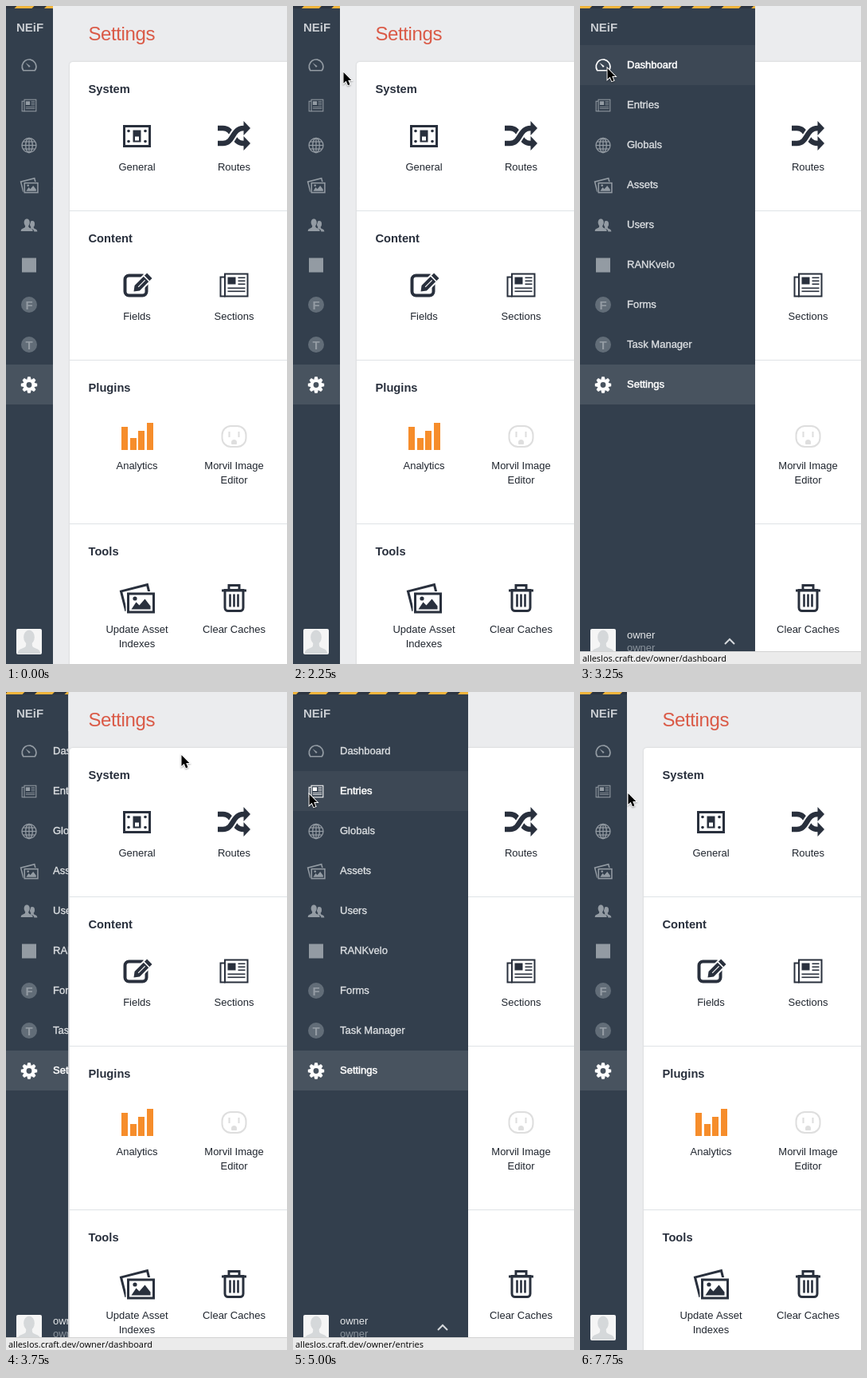
These frames come from a looping animation (353 by 824 pixels, 8 s). An HTML page with a canvas:

```html
<!DOCTYPE html>
<html lang="en">
<head>
<meta charset="utf-8">
<title>Settings sidebar</title>
<style>
html, body { margin: 0; width: 100%; height: 100%; overflow: hidden; background: #ebecee; }
canvas { display: block; width: 353px; height: 824px; }
</style>
</head>
<body>
<canvas id="stage"></canvas>
<script>
const W = 353, H = 824, LOOP = 8000, STEP = 250;
const canvas = document.getElementById('stage');
const ctx = canvas.getContext('2d');
const ratio = window.devicePixelRatio || 1;
canvas.width = W * ratio;
canvas.height = H * ratio;

const SANS = '"Liberation Sans", Arial, sans-serif';
const INK = '#29303d', NAV = '#333f4d', MUTED = '#939ba3', PAPER = '#fff';
const CLOSED = 59, OPEN = 220, SLIDE = 250, LINGER = 700;
const ROW = 50, ROWS_TOP = 49;

const VISITS = [
  { page: 'dashboard', enter: 2275, leave: 3530 },
  { page: 'entries', enter: 4750, leave: 5764 }
];
const STOPS = [
  { t: 250, x: 173, y: 171 },
  { t: 2250, x: 63, y: 83 },
  { t: 2500, x: 30, y: 78 },
  { t: 3250, x: 34, y: 78 },
  { t: 3750, x: 220, y: 79 },
  { t: 5000, x: 20, y: 128 },
  { t: 5500, x: 24, y: 129 },
  { t: 6000, x: 248, y: 130 },
  { t: 7750, x: 60, y: 127 }
];

const ramp = (t, from, length) => Math.min(1, Math.max(0, (t - from) / length));

function pointerAt(t) {
  let { x, y } = STOPS[0];
  STOPS.slice(1).forEach((stop, i) => {
    const p = ramp(t, STOPS[i].t, stop.t - STOPS[i].t);
    x += (stop.x - STOPS[i].x) * p;
    y += (stop.y - STOPS[i].y) * p;
  });
  return { x, y };
}

function sidebarWidth(t) {
  const open = VISITS.reduce((sum, v) => sum + ramp(t, v.enter, SLIDE) - ramp(t, v.leave, SLIDE), 0);
  return CLOSED + (OPEN - CLOSED) * open;
}

function rect(x, y, w, h, color) {
  if (color) ctx.fillStyle = color;
  ctx.fillRect(x, y, w, h);
}

function text(str, x, y, color, font = `13px ${SANS}`, align = 'left') {
  ctx.font = font;
  ctx.textAlign = align;
  ctx.fillStyle = color;
  ctx.fillText(str, x, y);
}

function line(...p) {
  ctx.beginPath();
  for (let i = 0; i < p.length; i += 2) ctx.lineTo(p[i], p[i + 1]);
}

function disc(x, y, rx, ry = rx) {
  ctx.beginPath();
  ctx.ellipse(x, y, rx, ry, 0, 0, Math.PI * 2);
}

function rounded(x, y, w, h, r) {
  ctx.beginPath();
  ctx.roundRect(x, y, w, h, r);
}

// Icons are drawn around their centre
function icon(draw, x, y, color, bg, scale = 1) {
  ctx.save();
  ctx.translate(x, y);
  ctx.scale(scale, scale);
  ctx.fillStyle = ctx.strokeStyle = color;
  ctx.lineWidth = 2;
  draw(color, bg);
  ctx.restore();
}

function news() {
  ctx.strokeRect(-11.5, -14, 28.5, 28);
  line(-11.5, -10, -17, -10, -17, 14, -11, 14);
  ctx.stroke();
  rect(-8, -10, 10, 9);
  for (let i = 0; i < 3; i++) rect(5, -10 + i * 4, 9, 1.6);
  for (let i = 0; i < 2; i++) rect(-8, 3 + i * 4, 22, 1.6);
}

function photos(color, bg) {
  ctx.lineWidth = 3;
  ctx.save();
  ctx.translate(-20, -8.5);
  ctx.rotate(-0.25);
  ctx.strokeRect(0, 0, 34, 24);
  ctx.restore();
  rect(-14, -8.5, 38, 29, bg);
  ctx.strokeRect(-11, -5.5, 32, 23);
  ctx.fillStyle = color;
  line(-7, 14, -1, 5, 3, 9, 10, 1, 17, 10, 17, 14);
  ctx.fill();
  disc(-2.5, 0.5, 2.6);
  ctx.fill();
}

function gauge() {
  ctx.lineWidth = 1.7;
  ctx.beginPath();
  ctx.arc(0, 1.3, 8.8, Math.PI * 0.81, Math.PI * 2.19);
  ctx.closePath();
  ctx.stroke();
  line(-4.5, -3.5, 1.6, 0.7, 0, 2.4);
  ctx.fill();
}

function globe() {
  ctx.lineWidth = 1.3;
  for (const rx of [9, 4.3]) {
    disc(0, 0, rx, 9);
    ctx.stroke();
  }
  rect(-0.6, -9, 1.2, 18);
  for (const y of [-4.5, 0, 4.5]) {
    const r = Math.sqrt(81 - y * y);
    rect(-r, y - 0.6, 2 * r, 1.2);
  }
}

function person(x, y, s) {
  ctx.save();
  ctx.translate(x, y);
  ctx.scale(s, s);
  disc(0, -4, 3.6, 4.7);
  ctx.fill();
  rect(-2, -2, 4, 6);
  ctx.beginPath();
  ctx.moveTo(-7.5, 7);
  ctx.bezierCurveTo(-7.5, 2.5, -2, 4, -2, 1);
  ctx.lineTo(2, 1);
  ctx.bezierCurveTo(2, 4, 7.5, 2.5, 7.5, 7);
  ctx.fill();
  ctx.restore();
}

function users(color, bg) {
  person(4, 2, 0.85);
  ctx.fillStyle = bg;
  person(-2.4, 0.2, 1.18);
  ctx.fillStyle = color;
  person(-2.8, 0.6, 1);
}

const square = () => rect(-9, -9, 18, 18);

const badge = letter => color => {
  disc(0, -0.5, 10);
  ctx.fillStyle = '#626d78';
  ctx.fill();
  text(letter, 0, 5, color, `bold 15px ${SANS}`, 'center');
};

function gear(color, bg) {
  disc(0, 0, 7.5);
  ctx.fill();
  for (let i = 0; i < 8; i++) {
    line(-2.6, -7, -1.7, -10.2, 1.7, -10.2, 2.6, -7);
    ctx.fill();
    ctx.rotate(Math.PI / 4);
  }
  disc(0, 0, 3.4);
  ctx.fillStyle = bg;
  ctx.fill();
}

function lightSwitch(color, bg) {
  ctx.lineWidth = 3;
  ctx.strokeRect(-16, -12, 32, 25);
  rect(-5, -7, 10, 15);
  rect(-2.5, 1, 5, 5, bg);
  ctx.fillStyle = color;
  for (const x of [-10.5, 10.5]) for (const y of [-6, 7]) {
    disc(x, y, 1.8);
    ctx.fill();
  }
}

function shuffle(color, bg) {
  const strand = (dir, width, paint) => {
    ctx.beginPath();
    ctx.moveTo(-20.5, -9.5 * dir);
    ctx.lineTo(-14, -9.5 * dir);
    ctx.bezierCurveTo(0, -9.5 * dir, -3, 9.5 * dir, 12, 9.5 * dir);
    ctx.lineTo(14, 9.5 * dir);
    ctx.lineWidth = width;
    ctx.strokeStyle = paint;
    ctx.stroke();
  };
  strand(1, 6.5, color);
  ctx.save();
  ctx.beginPath();
  ctx.rect(-9, -8, 16, 16);
  ctx.clip();
  strand(-1, 10.5, bg);
  ctx.restore();
  strand(-1, 6.5, color);
  for (const y of [-9.5, 9.5]) {
    line(12, y - 9, 20.5, y, 12, y + 9);
    ctx.fill();
  }
}

function edit(color, bg) {
  ctx.lineWidth = 4;
  rounded(-15, -12, 27, 25, 5);
  ctx.stroke();
  ctx.translate(-4, 8);
  ctx.rotate(-Math.PI / 4);
  line(0, 0, 6, -4.5, 28, -4.5, 28, 4.5, 6, 4.5);
  ctx.closePath();
  ctx.strokeStyle = bg;
  ctx.stroke();
  ctx.fill();
  rect(22, -5, 1.5, 10, bg);
  rect(8, -0.6, 12, 1.2, bg);
}

function bars() {
  [29, 15, 24, 34].forEach((h, i) => rect(Math.round(i * 10.67) - 19.5, 19.5 - h, 8, h));
}

function outlet() {
  rounded(-15, -10.5, 30, 26, 11);
  ctx.stroke();
  for (const x of [-7, 5]) rect(x, -3.5, 2, 7);
  rounded(-3.5, 6.5, 7, 6, [3.5, 3.5, 1, 1]);
  ctx.fill();
}

function trash() {
  ctx.lineWidth = 3;
  rect(-15.5, -11, 31, 3);
  ctx.strokeRect(-6.5, -16, 13, 6);
  rounded(-11.5, -10, 23, 26, [0, 0, 4, 4]);
  ctx.stroke();
  for (let x = -6.3; x < 6; x += 5) rect(x, -5, 2.6, 16);
}

const SECTIONS = [
  { name: 'System', top: 69, tiles: [[lightSwitch, 'General'], [shuffle, 'Routes']] },
  { name: 'Content', top: 256, tiles: [[edit, 'Fields'], [news, 'Sections']] },
  { name: 'Plugins', top: 443, tiles: [[bars, 'Analytics'], [outlet, 'Morvil Image', 'Editor']] },
  { name: 'Tools', top: 648, tiles: [[photos, 'Update Asset', 'Indexes'], [trash, 'Clear Caches']] }
];
const TINTS = new Map([[bars, '#f68d2b'], [outlet, '#dedede']]);

const MENU = [
  ['Dashboard', gauge], ['Entries', news, 0.52], ['Globals', globe], ['Assets', photos, 0.52],
  ['Users', users], ['RANKvelo', square], ['Forms', badge('F')],
  ['Task Manager', badge('T')], ['Settings', gear]
];

function drawPage() {
  rect(0, 0, W, H, '#ebecee');
  ctx.letterSpacing = '-0.4px';
  text('Settings', 103.5, 43, '#da5a47', `24px ${SANS}`);
  ctx.letterSpacing = '0px';

  ctx.save();
  ctx.shadowColor = 'rgba(40,50,60,.22)';
  ctx.shadowBlur = 2 * ratio;
  ctx.fillStyle = PAPER;
  rounded(80, 70, 300, 800, 4);
  ctx.fill();
  ctx.restore();

  SECTIONS.forEach(({ name, top, tiles }, i) => {
    if (i) rect(80, top, W, 1, '#dfe3e6');
    text(name, 103.5, top + 40, INK, `bold 14.7px ${SANS}`);
    tiles.forEach(([draw, ...words], col) => {
      const x = 164.5 + col * 122;
      icon(draw, x, top + 93.5, TINTS.get(draw) || INK, PAPER);
      words.forEach((word, n) => text(word, x, top + 137 + n * 18, '#20262f', undefined, 'center'));
    });
  });
}

function drawStripe(width, t) {
  const gap = 37.5, start = 15 + (t - 2500) * 0.0168;
  rect(0, 0, width, 3, '#2d3541');
  ctx.fillStyle = '#f1b43c';
  for (let x = start % gap - 2 * gap; x < width; x += gap) {
    line(x, 3, x + 3, 0, x + 25, 0, x + 22, 3);
    ctx.fill();
  }
}

function drawMenu(width, hover) {
  MENU.forEach(([label, draw, scale], i) => {
    const selected = label === 'Settings', lit = selected || i === hover;
    const top = ROWS_TOP + i * ROW;
    const bg = selected ? '#48535f' : lit ? '#3d4855' : NAV;
    const color = lit ? '#fff' : '#dde0e3';
    rect(0, top, width, ROW, bg);
    icon(draw, 29, top + 25.5, lit ? '#fff' : MUTED, bg, scale);
    text(label, 59, top + 29, color);
    ctx.strokeStyle = color;
    ctx.lineWidth = lit ? 0.5 : 0.35;
    ctx.strokeText(label, 59, top + 29);
  });
}

function drawAccount() {
  ctx.save();
  ctx.fillStyle = '#f5f5f5';
  rounded(13, 780, 32, 32, 2);
  ctx.fill();
  ctx.clip();
  ctx.fillStyle = '#d5d8da';
  person(29, 798, 1.9);
  ctx.restore();
  text('owner', 59, 792, '#e4e6e8');
  text('owner', 59, 808, '#8a939c');
  ctx.strokeStyle = '#d5d8dc';
  ctx.lineWidth = 2;
  line(182, 799, 188, 793, 194, 799);
  ctx.stroke();
}

function drawSidebar(width, hover, t) {
  ctx.save();
  ctx.beginPath();
  ctx.rect(0, 0, width, H);
  ctx.clip();
  rect(0, 0, width, H, NAV);
  drawStripe(width, t);
  text('NEiF', 13, 32, '#c8ccd1', `bold 15px ${SANS}`);
  drawMenu(width, hover);
  drawAccount();
  ctx.restore();
}

function drawStatus(page) {
  rect(0, 808, W, 16, '#ebebeb');
  rect(0, 808, W, 1, '#d2d2d2');
  text('alleslos.craft.dev/owner/' + page, 3, 821, '#000', '11px "Open Sans", sans-serif');
}

function drawPointer({ x, y }) {
  ctx.save();
  ctx.translate(x + 0.5, y);
  ctx.scale(0.95, 0.95);
  line(0, 0, 0, 14.5, 3.4, 11.4, 5.8, 17, 8.4, 16, 6, 10.6, 10.4, 10.6);
  ctx.closePath();
  ctx.shadowColor = 'rgba(0,0,0,.35)';
  ctx.shadowBlur = 2 * ratio;
  ctx.shadowOffsetY = ratio;
  ctx.strokeStyle = '#fff';
  ctx.lineWidth = 2;
  ctx.stroke();
  ctx.shadowColor = 'transparent';
  ctx.fillStyle = '#000';
  ctx.fill();
  ctx.restore();
}

function render(t) {
  ctx.setTransform(ratio, 0, 0, ratio, 0, 0);
  const width = sidebarWidth(t), pointer = pointerAt(t);
  const hover = pointer.x < width ? Math.floor((pointer.y - ROWS_TOP) / ROW) : -1;
  const visit = VISITS.find(v => t > v.enter && t < v.leave + LINGER);
  drawPage();
  drawSidebar(width, hover, t);
  if (visit) drawStatus(visit.page);
  if (t >= STOPS[0].t) drawPointer(pointer);
}

const began = performance.now();
function tick() {
  const t = (performance.now() - began) % LOOP;
  render(Math.floor(t / STEP) * STEP);
  requestAnimationFrame(tick);
}
tick();
</script>
</body>
</html>
```
